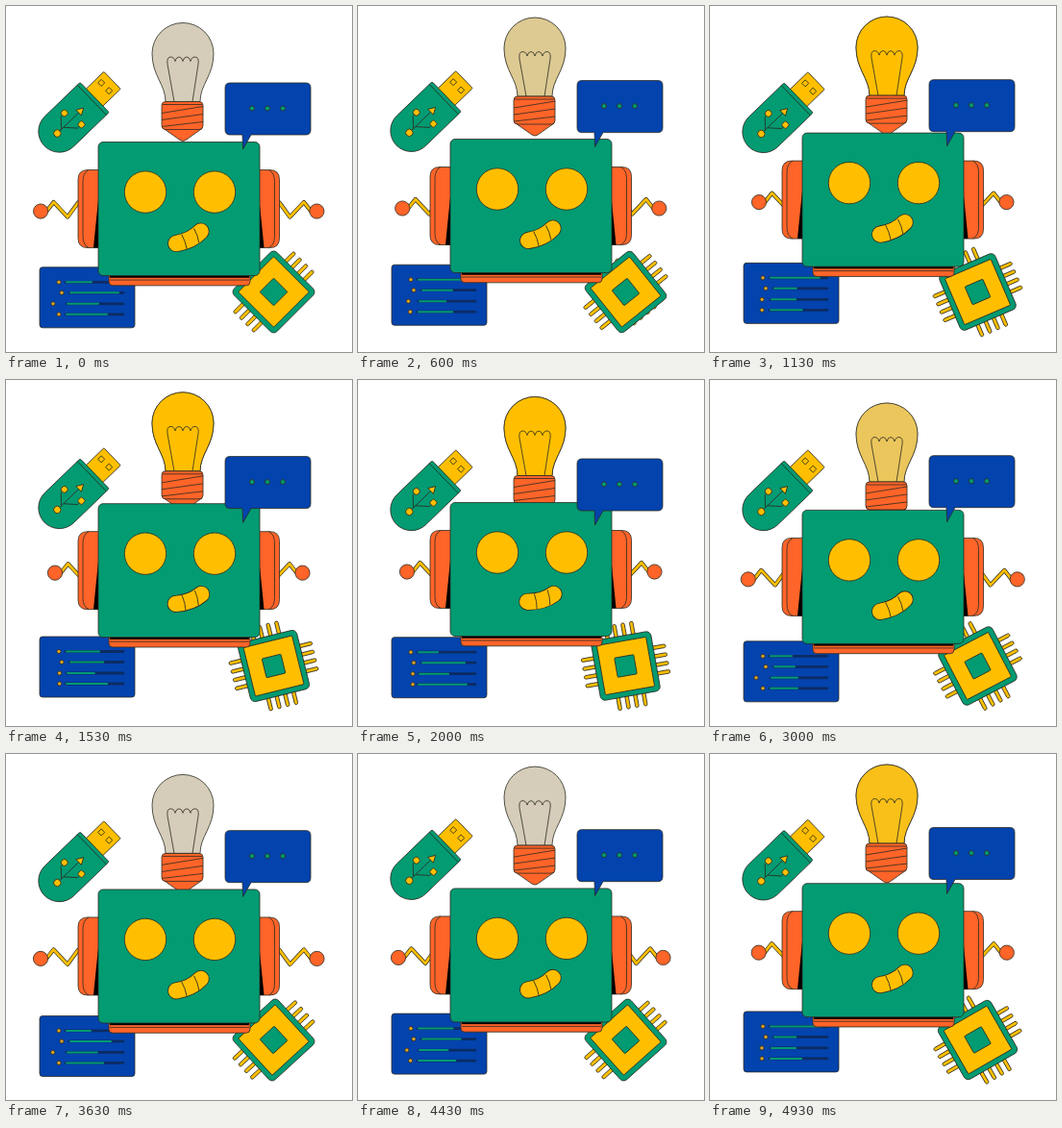
These frames come from a looping animation (360 px wide and 360 px high, 5 s). An HTML page:

```html
<!DOCTYPE html>
<html lang="en">
<head>
<meta charset="utf-8">
<title>Robot with ideas</title>
<style>
  html, body { margin: 0; width: 100%; height: 100%; overflow: hidden; background: #fff; }
  svg { display: block; width: 100vw; height: 100vh; stroke: #2b2b22; stroke-width: .8; stroke-linejoin: round; }
  .green { fill: #039b72; }
  .orange { fill: #ff6428; }
  .yellow { fill: #ffbf00; }
  .blue { fill: #0343ae; }
  .black { fill: #000; stroke: none; }
  .line { fill: none; }
</style>
</head>
<body>
<svg viewBox="0 0 360 360">
  <defs>
    <rect id="pin" class="yellow" x="-1.8" y="-44.5" width="3.6" height="16" rx="1.8"/>
    <g id="pins">
      <use href="#pin" x="-13.5"/>
      <use href="#pin" x="-4.5"/>
      <use href="#pin" x="4.5"/>
      <use href="#pin" x="13.5"/>
    </g>
    <path id="glass" d="M166 82C166 64 152 55 152 32A32 32 0 0 1 216 32C216 55 202 64 202 82Z"/>
    <path id="smile" d="M-14 2Q2 4 14 -3" fill="none" stroke-linecap="round"/>
    <path id="zigzag" d="M42 72L49.5 62.5L64 78L75 63L90 78" fill="none"/>
    <g id="ear">
      <g class="arm">
        <use href="#zigzag" stroke-width="4.2"/>
        <use href="#zigzag" stroke="#ffbf00" stroke-width="2.8"/>
        <circle class="orange" cx="36" cy="72" r="7.6"/>
      </g>
      <path class="orange" d="M98 29H85Q75 29 75 39V100Q75 110 85 110H98Z"/>
      <path class="line" d="M86 29Q80 32 80 41V98Q80 107 86 110"/>
      <path class="black" d="M96 60V110H91Z"/>
    </g>
  </defs>

  <g id="panel">
    <rect class="blue" x="35" width="99" height="63" rx="3"/>
    <g id="rows"></g>
  </g>

  <g id="chip">
    <use href="#pins"/>
    <use href="#pins" transform="rotate(180)"/>
    <g id="sidePins">
      <use href="#pins" transform="rotate(90)"/>
      <use href="#pins" transform="rotate(270)"/>
    </g>
    <rect class="green" x="-31.5" y="-31.5" width="63" height="63" rx="5"/>
    <rect class="yellow" x="-26" y="-26" width="52" height="52" rx="1"/>
    <rect class="green" x="-10.2" y="-10.2" width="20.4" height="20.4" rx="1"/>
  </g>

  <g id="usb">
    <g transform="translate(55.5 129.7) rotate(-44)">
      <rect class="yellow" x="48" y="-12.5" width="28.5" height="25" rx="1"/>
      <path class="line" d="M64 -8.5h5v5h-5zM64 3h5v5h-5z"/>
      <path class="green" d="M49 -21.7H0A21.7 21.7 0 0 0 0 21.7H49Q51 21.7 51 20V-20Q51 -21.7 49 -21.7Z"/>
      <path class="line" d="M47 -21.7V21.7M-3 0H30M3 0L12 -10H17M6 0L16 10.8H22"/>
      <circle class="yellow" cx="-3" r="3.7"/>
      <circle class="yellow" cx="17" cy="-10" r="3.4"/>
      <rect class="yellow" x="18.5" y="7.8" width="6" height="6" rx="1.5"/>
      <path class="yellow" d="M28 -4L35 0L28 4Z"/>
    </g>
  </g>

  <g id="bulb">
    <use href="#glass" fill="#d5cdb9"/>
    <use id="glow" href="#glass" class="yellow"/>
    <path class="line" d="M175 82L168 43Q167 36 171 35.5Q175 35.5 176 40Q177 35.5 180 35.5Q183 35.5 184 40Q185 35.5 188 35.5Q191 35.5 192 40Q193 35.5 197 35.5Q201 36 200 43L194 82"/>
    <path class="orange" d="M164 110L181 122Q184 124 187 122L204 110Z"/>
    <rect class="orange" x="162" y="82" width="43" height="29" rx="4"/>
    <path class="line" d="M162 94L205 87M162 101L205 95M162 108L205 103M163 85H204"/>
  </g>

  <g id="head">
    <use href="#ear"/>
    <use href="#ear" transform="translate(359.5 0) scale(-1 1)"/>
    <rect class="orange" x="107" y="134" width="147" height="15.3" rx="4"/>
    <rect class="black" x="108" y="138" width="145" height="3.2"/>
    <path class="line" d="M108 143.5H253"/>
    <rect class="green" x="96" width="168" height="139" rx="5"/>
    <circle class="yellow" cx="145" cy="52" r="21.7"/>
    <circle class="yellow" cx="217" cy="52" r="21.7"/>
    <g id="mouth">
      <use href="#smile" stroke-width="18"/>
      <use href="#smile" stroke="#ffbf00" stroke-width="16.4"/>
      <path class="line" d="M-6 -5.5Q-4 3 -5 11M8 -8Q10 0 9 8"/>
    </g>
  </g>

  <g id="bubble">
    <path class="blue" d="M233 0H312Q317 0 317 5V49Q317 54 312 54H255L246.5 69L246 54H233Q228 54 228 49V5Q228 0 233 0Z"/>
    <g class="green">
      <circle cx="256" cy="26.5" r="2.5"/>
      <circle cx="272" cy="26.5" r="2.5"/>
      <circle cx="288" cy="26.5" r="2.5"/>
    </g>
  </g>
</svg>
<script>
const $ = id => document.getElementById(id);
const LOOP = 5000, CYCLE = 4000;
const clamp = p => Math.min(1, Math.max(0, p));
const ease = p => p < .5 ? 2 * p * p : 1 - 2 * (1 - p) ** 2;
const wrap = t => (t % CYCLE + CYCLE) % CYCLE;
const ramp = (t, from, to) => clamp((t - from) / (to - from));

// Eased swing from a to b and back over one cycle
const swing = (t, a, b) => a + (b - a) * ease(1 - Math.abs(1 - wrap(t) / 2000));

// Eased values, one key per second of the cycle
function keys(t, values) {
  const s = wrap(t) / 1000, i = Math.floor(s), a = values[i];
  return a + (values[(i + 1) % values.length] - a) * ease(s - i);
}

const rows = [
  { y: 15.5, start: 62, dot: [55, 55, 55, 55], length: [26, 52, 20, 22] },
  { y: 26.5, start: 66, dot: [58, 58, 58, 58], length: [50, 22, 44, 21] },
  { y: 38, start: 63, dot: [49, 54, 57, 48], length: [32, 25, 30, 27] },
  { y: 49, start: 62, dot: [55, 54, 57, 55], length: [42, 32, 50, 28] }
];
$('rows').innerHTML = rows.map(({ y, start }) => `
  <g transform="translate(0 ${y})">
    <path d="M${start} 0H122" stroke="#0b2c63" stroke-width="2.8" stroke-linecap="round"/>
    <path class="bar" stroke="#039b72" stroke-width="2" stroke-linecap="round"/>
    <circle class="dot" fill="#e0a52a" r="2.1"/>
  </g>`).join('');
const bars = document.querySelectorAll('.bar'), dots = document.querySelectorAll('.dot');
const arm = document.querySelector('.arm');

const place = (id, x, y, angle = 0) =>
  $(id).setAttribute('transform', `translate(${x} ${y}) rotate(${angle})`);

function draw(now) {
  const t = now % LOOP, c = wrap(t), late = wrap(t + 60);
  place('head', 0, swing(late, 141.6, 127.5));
  place('mouth', 190, 99.7, -16 + 10 * ease(1 - clamp(Math.abs(c - 2000) / 1000)));
  place('bulb', 0, swing(t - 1000, 11, 24));
  place('panel', 0, swing(t - 1500, 267, 272.5));
  place('usb', 0, swing(t - 500, 0, 6));
  place('chip', 278.5, 297.5, swing(t, 45, 80));
  // The side pins slide out as the chip turns
  $('sidePins').setAttribute('transform', `scale(${.65 + .35 * clamp(swing(t, -.3, 2.7))} 1)`);
  place('bubble', 0, keys(t, [80, 76.5, 82, 78.7]));
  $('glow').setAttribute('opacity', ramp(c, 500, 1000) - ramp(c, 2750, 3250));
  const tuck = ease(ramp(late, 0, 1100)) - ease(ramp(late, 2350, 3450));
  arm.setAttribute('transform', `translate(${15 * tuck} 0)`);
  rows.forEach(({ start, dot, length }, i) => {
    bars[i].setAttribute('d', `M${start + 1} 0h${keys(t, length)}`);
    dots[i].setAttribute('cx', keys(t, dot));
  });
}

function tick() {
  draw(performance.now());
  requestAnimationFrame(tick);
}
tick();
</script>
</body>
</html>
```
